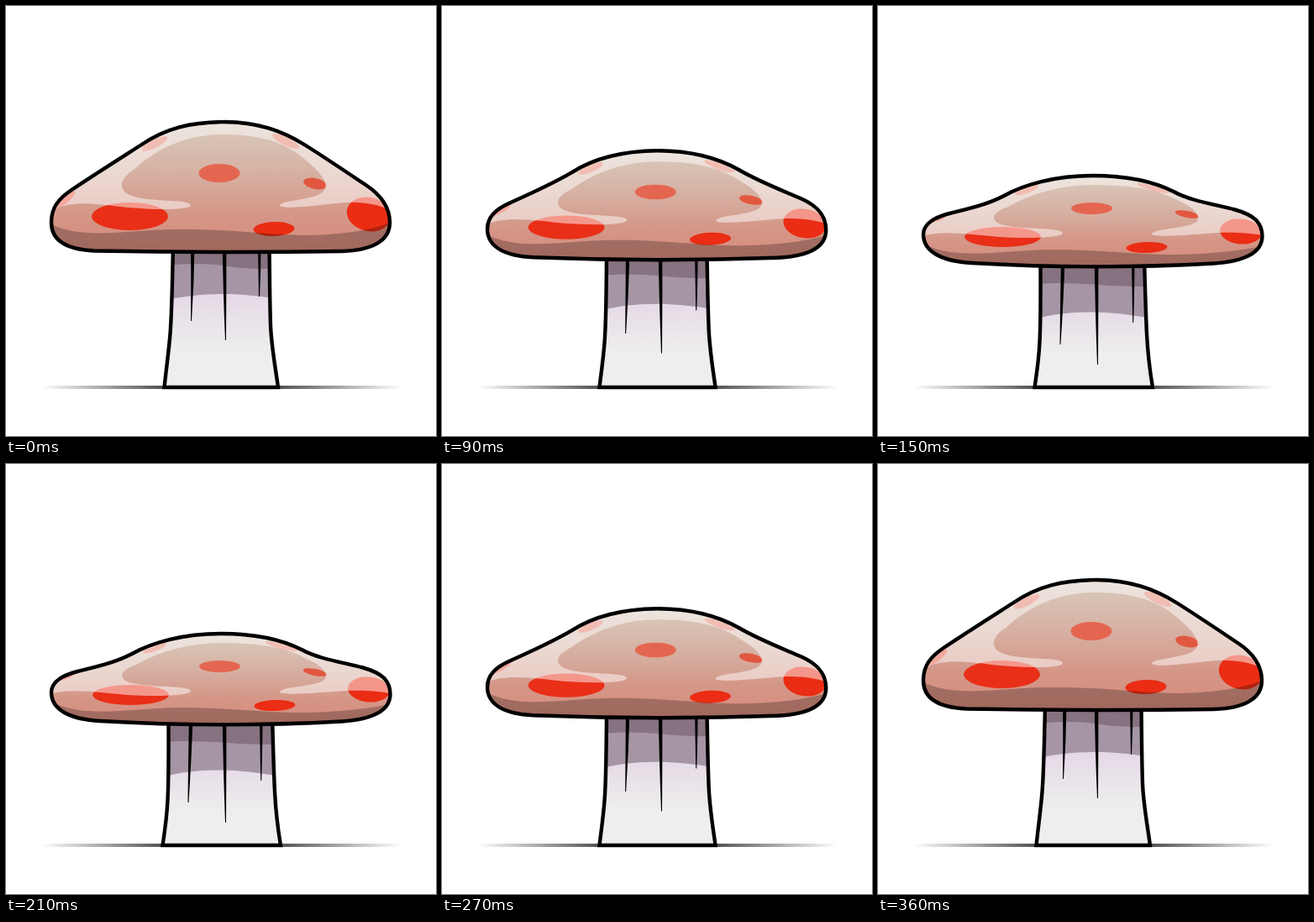
Write an HTML page that moves like this. It is 512 px wide and 512 px high and loops after 390 ms.

```html
<!DOCTYPE html>
<html lang="en">
<head>
<meta charset="utf-8">
<title>Squashing mushroom</title>
<style>
  html, body { margin: 0; width: 100%; height: 100%; overflow: hidden; background: #fff; }
  svg { display: block; width: 100vw; height: 100vh; }
</style>
</head>
<body>
<svg viewBox="0 0 512 512">
  <defs>
    <linearGradient id="capFill" x2="0" y2="1">
      <stop offset="0" stop-color="#d9cbbd"/>
      <stop offset=".4" stop-color="#d6b0a2"/>
      <stop offset=".7" stop-color="#d49788"/>
      <stop offset="1" stop-color="#d88a7c"/>
    </linearGradient>
    <linearGradient id="stemFill" x2="0" y2="1">
      <stop offset=".36" stop-color="#e5d9e6"/>
      <stop offset=".74" stop-color="#eee"/>
    </linearGradient>
    <linearGradient id="groundFill">
      <stop offset="0" stop-opacity="0"/>
      <stop offset=".5" stop-opacity="1"/>
      <stop offset="1" stop-opacity="0"/>
    </linearGradient>
    <clipPath id="capClip"><path data-shape="cap"/></clipPath>
    <clipPath id="stemClip"><path data-shape="stem"/></clipPath>
  </defs>
  <rect width="512" height="512" fill="#fff"/>
  <path data-shape="stem" fill="url(#stemFill)"/>
  <g clip-path="url(#stemClip)">
    <path data-shape="midBand" fill="#a696a5"/>
    <path data-shape="topBand" fill="#867280"/>
  </g>
  <path data-shape="grooves"/>
  <path data-shape="stem" fill="none" stroke="#000" stroke-width="4.4"/>
  <rect x="42" y="452" width="429" height="4" fill="url(#groundFill)"/>
  <path data-shape="cap" fill="url(#capFill)"/>
  <g clip-path="url(#capClip)">
    <g id="spots"></g>
    <path data-shape="gloss" fill="#fff" fill-opacity=".5"/>
    <path data-shape="shade" fill-opacity=".25"/>
  </g>
  <path data-shape="cap" fill="none" stroke="#000" stroke-width="4.4" stroke-linejoin="round"/>
</svg>
<script>
  const STEP = 30, STEPS = 13, HALF = 6;

  // Each shape: tall pose, squashed pose.
  const shapes = {
    cap: [
      `M260,138 C300,138.5 328,148 356,165.5 C380,180.5 408,199.5 429,213.5 C447,225.5 457,240 457,258
       C457,280 435,291 400,292 C300,293.5 220,293.5 105,291.5 C75,290 54,281 54,258
       C54,240 62,230 78,219 C105,201 135,182 160,166 C190,145 220,138.5 260,138Z`,
      `M256,202 C300,202 330,210 352,221 C372,232 400,236 425,242.5 C448,249 457.5,258 457.5,274
       C457.5,295 435,304 400,306.5 C300,312 215,312 112,306 C75,304 54,292 54,272
       C54,260 66,252 85,247 C110,241 131,236 150,226 C173,213 210,202 256,202Z`
    ],
    gloss: [
      `M50,247 C72,229 110,236 145,240 C180,243 215,243 220,238 C222,228 160,236 142,222
       C134,214 138,204 152,195 C185,165 220,153 260,153 C320,153 345,172 362,188
       C376,200 384,212 379,219 C372,232 326,230 326,238 C334,243 375,236 405,234
       C430,233 450,238 462,246 L462,100 L50,100Z`,
      `M50,275 C72,266 110,272 145,275 C180,277 215,276 220,271 C222,262 160,268 142,258
       C134,252 138,245 155,239 C185,222 220,213 255,213 C315,213 340,222 360,233
       C376,240 384,249 380,256 C372,266 326,264 326,272 C334,276 375,272 405,270
       C430,269 450,271 462,274 L462,100 L50,100Z`
    ],
    shade: [
      'M50,258 C90,280 145,266 200,266 C270,265 310,273 360,273 C400,272 435,268 462,256 L462,320 L50,320Z',
      'M50,281 C90,304 145,291 205,290 C270,290 310,297 360,296 C400,295 435,291 462,285 L462,320 L50,320Z'
    ],
    stem: [
      'M199,285 C198,330 197.5,365 195.5,390 C194,410 191,430 188.5,454 L324,454 C320,425 316,405 315,380 C314,350 314,320 313.5,285Z',
      'M193.5,300 C193.5,340 194,370 192.5,400 C191.5,420 189,438 186.5,454 L327,454 C323,430 321,410 320,390 C318.5,360 318,330 317,300Z'
    ],
    topBand: [
      'M180,280 L180,311 C215,305 245,307 265,310 C285,313 300,313 330,313 L330,280Z',
      'M180,300 L180,332 C215,328 245,331 265,332 C285,334 300,334 330,334 L330,300Z'
    ],
    midBand: [
      'M180,353 C220,342 270,339 330,350 L330,280 L180,280Z',
      'M180,375 C220,362 270,361 330,373 L330,300 L180,300Z'
    ],
    grooves: [
      `M220,285 L224.5,285 Q224,330 221,375 L220,375 Q220.5,330 220,285Z
       M257.7,285 L262.3,285 Q262.5,340 262,398 L261,398 Q258.5,340 257.7,285Z
       M300,285 L303.5,285 Q303.5,315 302,346 L301,346 Q300.5,315 300,285Z`,
      `M218,300 L222.5,300 Q221,350 217.5,403 L216.5,403 Q217,350 218,300Z
       M257.7,300 L262.3,300 Q262.5,360 262,427 L261,427 Q258.5,360 257.7,300Z
       M302,300 L305.5,300 Q305.5,335 304.2,377 L303.2,377 Q302.5,335 302,300Z`
    ]
  };

  // Colour, then centre, radii and tilt in both poses.
  const spots = [
    ['#e92f17', [147.5, 250.5, 45.5, 16.5, 0], [148.5, 275, 45.5, 12, 0]],
    ['#e56650', [254, 199, 24.5, 11, 0], [254.5, 241, 24.5, 7, 0]],
    ['#e2573f', [368, 211.5, 14, 6.5, 12], [368, 248, 14.5, 4, 11]],
    ['#ea2d14', [319, 265.5, 24.5, 8.5, -2], [320, 287.5, 24.5, 6.5, -2]],
    ['#ea2d14', [432, 248, 26.5, 20, 14], [432, 268.5, 25, 15, 5]],
    ['#e47a66', [177, 164, 17, 5, -27], [177, 219, 15, 4, -20]],
    ['#e47a66', [333, 161, 18, 5, 26], [328, 217, 20, 3, 15]],
    ['#e8503a', [70, 230, 15, 5, -38], [68, 254, 13, 3, -15]]
  ];

  const mix = (a, b, u) => a + (b - a) * u;

  function mixPath([a, b], u) {
    const ends = b.match(/[\d.]+/g);
    let i = 0;
    return a.replace(/[\d.]+/g, n => mix(+n, +ends[i++], u).toFixed(2));
  }

  const group = document.getElementById('spots');
  const ovals = spots.map(([fill]) => {
    const el = document.createElementNS('http://www.w3.org/2000/svg', 'ellipse');
    el.setAttribute('fill', fill);
    return group.appendChild(el);
  });
  const paths = [...document.querySelectorAll('[data-shape]')];

  function draw(ms) {
    const step = Math.floor(ms / STEP) % STEPS;
    const wave = k => (1 - Math.cos(Math.PI * k / HALF)) / 2;
    const u = wave(step) / wave(HALF - 1);

    for (const p of paths) p.setAttribute('d', mixPath(shapes[p.dataset.shape], u));
    spots.forEach(([, a, b], i) => {
      const [x, y, rx, ry, tilt] = a.map((v, j) => mix(v, b[j], u));
      ovals[i].setAttribute('rx', rx);
      ovals[i].setAttribute('ry', ry);
      ovals[i].setAttribute('transform', `translate(${x} ${y}) rotate(${tilt})`);
    });
  }

  let start;
  function tick(now) {
    start ??= now;
    draw(now - start);
    requestAnimationFrame(tick);
  }
  draw(0);
  requestAnimationFrame(tick);
</script>
</body>
</html>
```
